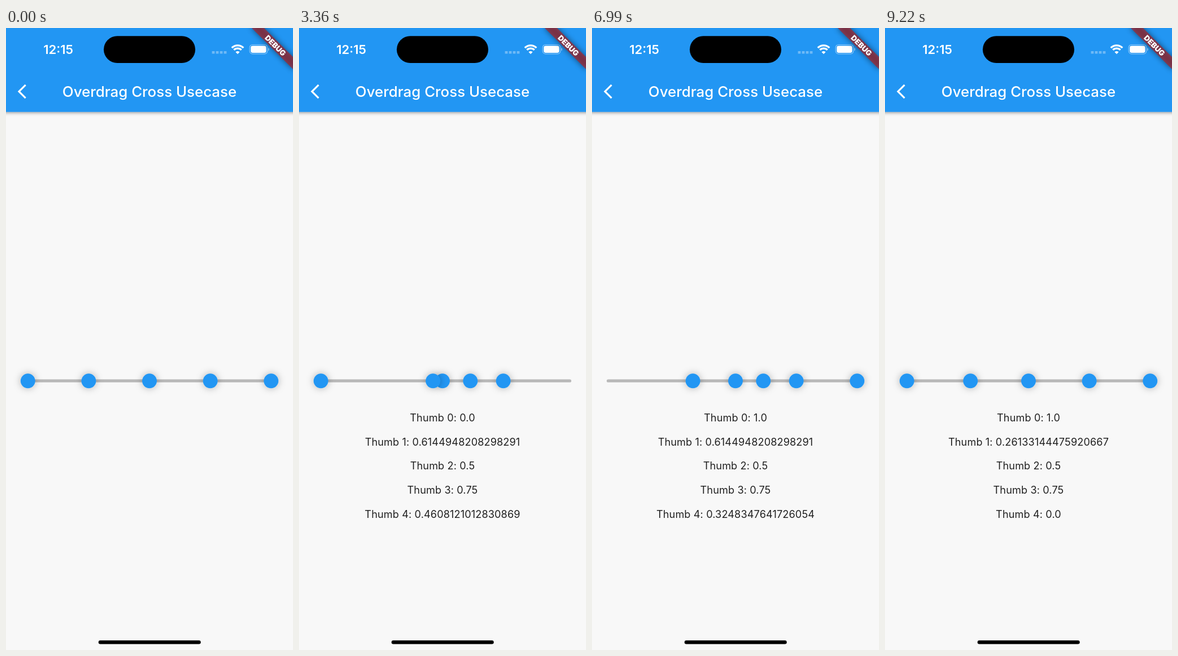
An HTML page for the animation above (9.27 s loop, 508 by 1102 pixels).

```html
<!DOCTYPE html>
<html lang="en">
<head>
<meta charset="utf-8">
<title>Overdrag Cross Usecase</title>
<style>
  html, body { margin: 0; height: 100%; overflow: hidden; background: #f8f8f8; }
  svg { display: block; width: 100%; height: 100%; }
  text { font-family: Inter, "Open Sans", sans-serif; text-anchor: middle; }
  #labels { font-size: 18.1px; letter-spacing: .13px; fill: rgba(0, 0, 0, .87); }
</style>
</head>
<body>
<svg viewBox="0 0 508 1102">
  <defs>
    <filter id="thumbShadow" x="-150%" y="-150%" width="400%" height="400%">
      <feDropShadow dx="0" dy="0" stdDeviation="6.4" flood-color="#000" flood-opacity=".3"/>
    </filter>
    <filter id="barShadow" x="-5%" y="-20%" width="110%" height="140%">
      <feDropShadow dx="0" dy="2.2" stdDeviation="2.6" flood-color="#000" flood-opacity=".32"/>
    </filter>
    <filter id="blur" x="-30%" y="-150%" width="160%" height="400%">
      <feGaussianBlur stdDeviation="5.1"/>
    </filter>
  </defs>

  <rect x="-20" y="-20" width="548" height="168.7" fill="#2196f3" filter="url(#barShadow)"/>
  <path transform="translate(20.7 97) scale(1.2926)" fill="#fff"
        d="M11.67 3.87 9.9 2.1 0 12l9.9 9.9 1.77-1.77L3.54 12z"/>
  <text x="254" y="122" font-size="25.85" font-weight="500" fill="#fff">Overdrag Cross Usecase</text>

  <g fill="#fff">
    <text x="92.7" y="46" font-size="22" font-weight="600">12:15</text>
    <path d="M367 43.2h26" fill="none" stroke="#fff" stroke-opacity=".35" stroke-width="4.6"
          stroke-dasharray="4.8 2.2" transform="translate(-2.4 0)"/>
    <path d="M399.7 35.2a14.5 14.5 0 0 1 20.6 0M403.4 38.9a9.3 9.3 0 0 1 13.2 0"
          fill="none" stroke="#fff" stroke-width="3.3"/>
    <path d="M410 46.2l-3.6-3.7a5 5 0 0 1 7.2 0z"/>
    <rect x="431.2" y="29.5" width="31.6" height="16.4" rx="5.2" fill="none"
          stroke="#fff" stroke-opacity=".45" stroke-width="1.2"/>
    <rect x="433.2" y="31.5" width="27.4" height="12.4" rx="3.4"/>
    <path d="M464.2 35v5.6q1.8-.8 1.8-2.8t-1.8-2.8z" opacity=".5"/>
  </g>
  <rect x="173" y="14.3" width="162" height="47.8" rx="23.9"/>

  <rect x="26" y="622.6" width="456" height="5.2" rx="2.6" fill="#b9b9b9"/>
  <g id="thumbs" fill="#2196f3"></g>
  <g id="labels"></g>
  <rect x="163.7" y="1085" width="181" height="6.5" rx="3.25"/>

  <g transform="translate(508 0) rotate(45)">
    <rect x="-51.7" y="36.2" width="103.4" height="15.5" opacity=".5" filter="url(#blur)"/>
    <rect x="-51.7" y="36.2" width="103.4" height="15.5" fill="#b71c1c" fill-opacity=".627"/>
    <text y="48.7" font-size="13.2" font-weight="900" fill="#fff">DEBUG</text>
  </g>
</svg>
<script>
const LOOP = 9270, LABELS_FROM = 940, STEP = 28;

// Drag paths of each thumb: [ms, value]
const paths = [
  [[4412, 0], [4870, 0.37110481586402266], [5780, 0.8744098349941352], [6080, 1]],
  [[912, 0.25], [1860, 0.605], [2020, 0.6144948208298291],
   [8602, 0.6144948208298291], [9220, 0.26133144475920667]],
  [[0, 0.5]],
  [[0, 0.75]],
  [[2822, 1], [3360, 0.4608121012830869], [3680, 0.3248347641726054],
   [6962, 0.3248347641726054], [7450, 0.08970728541906427], [7690, 0]],
];

const add = (parent, tag, attrs) => {
  const el = document.createElementNS("http://www.w3.org/2000/svg", tag);
  for (const key in attrs) el.setAttribute(key, attrs[key]);
  return document.getElementById(parent).appendChild(el);
};
const thumbs = paths.map(() => add("thumbs", "circle", { cy: 625.3, r: 12.95, filter: "url(#thumbShadow)" }));
const labels = paths.map((_, i) => add("labels", "text", { x: 254, y: 696.9 + i * 42.66 }));

const slope = (p, i) => (p[i + 1][1] - p[i][1]) / (p[i + 1][0] - p[i][0]);

// Monotone tangent: at rest at both ends and around pauses
function tangent(p, i) {
  if (i === 0 || i === p.length - 1) return 0;
  const a = slope(p, i - 1), b = slope(p, i);
  return a * b > 0 ? 2 * a * b / (a + b) : 0;
}

function valueAt(p, t) {
  if (t < p[0][0]) return p[0][1];
  const i = p.findLastIndex(key => key[0] <= t);
  if (i === p.length - 1) return p[i][1];
  const [t0, v0] = p[i], [t1, v1] = p[i + 1], span = t1 - t0;
  const steps = Math.round(span / STEP);
  const u = Math.floor((t - t0) / span * steps) / steps;
  return v0 + (v1 - v0) * u * u * (3 - 2 * u)
    + span * u * (1 - u) * (tangent(p, i) * (1 - u) - tangent(p, i + 1) * u);
}

const format = v => Number.isInteger(v) ? v.toFixed(1) : String(v);

let start;
function draw(now) {
  start ??= now;
  const t = (now - start) % LOOP;
  paths.forEach((path, i) => {
    const v = valueAt(path, t);
    thumbs[i].setAttribute("cx", 38.75 + 430.5 * v);
    labels[i].textContent = t < LABELS_FROM ? "" : `Thumb ${i}: ${format(v)}`;
  });
  requestAnimationFrame(draw);
}
requestAnimationFrame(draw);
</script>
</body>
</html>
```
